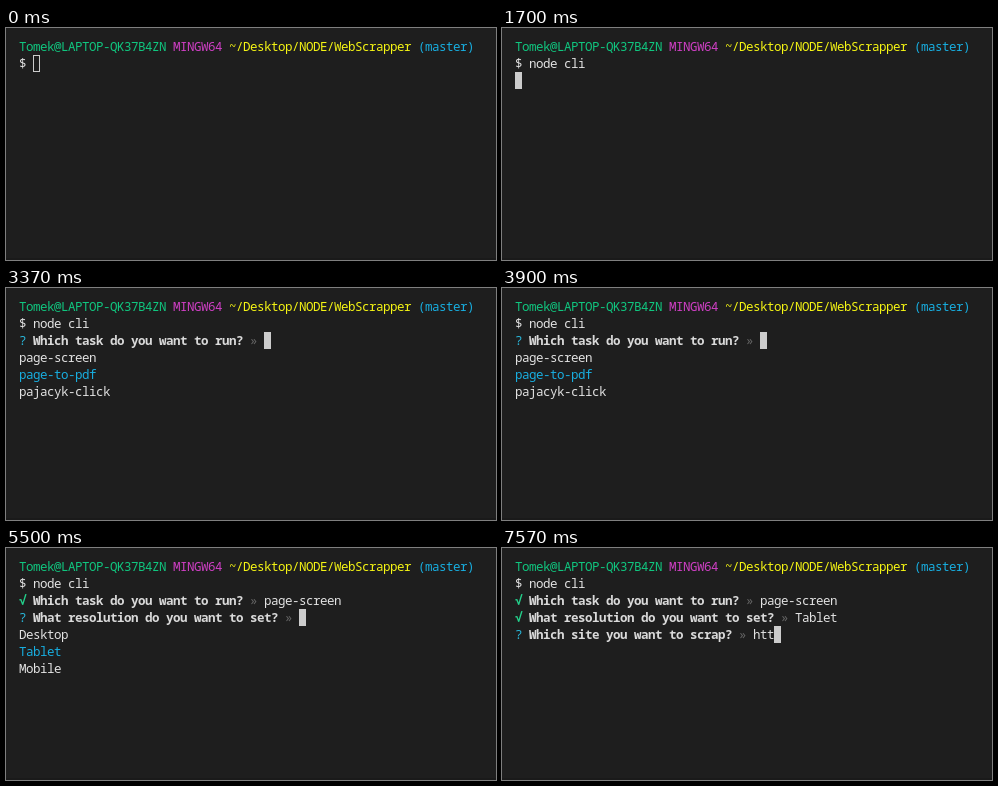
An HTML page for the animation above (8000 ms loop, 490x232 px).

```html
<!DOCTYPE html>
<html lang="en">
<head>
<meta charset="utf-8">
<title>Terminal prompt</title>
<style>
  html, body { margin: 0; width: 100%; height: 100%; overflow: hidden; background: #1e1e1e; }
  body::after { content: ""; position: absolute; left: 0; right: 0; top: 230px; height: 2px; background: #1a1a1a; }
  #term {
    position: absolute; left: 13px; top: 10px; color: #e2e2e2; white-space: pre;
    font: 500 12.5px/17px "Noto Sans Mono", "DejaVu Sans Mono", monospace;
    letter-spacing: -.5px;
    font-variant-ligatures: none;
  }
  #term div { height: 17px; }
  b { color: #dadada; }
  .green { color: #10c67f; }
  .magenta { color: #cf3fc4; }
  .yellow { color: #f5f514; }
  .cyan { color: #18aee0; }
  .ask { color: #29b8db; }
  .done { color: #23d18b; font-weight: bold; }
  .dim { color: #666; }
  .cursor { display: inline-block; width: 7px; height: 17px; vertical-align: top; box-sizing: border-box; background: #ccc; }
  .hollow { background: none; border: 1px solid #ccc; }
</style>
</head>
<body>
<div id="term"></div>
<script>
const LOOP = 8000;
const term = document.getElementById("term");

const span = (cls, text = "") => `<span class="${cls}">${text}</span>`;
const cursor = span("cursor");
const hollow = span("cursor hollow");

const header = [
  span("green", "Tomek@LAPTOP-QK37B4ZN"),
  span("magenta", "MINGW64"),
  span("yellow", "~/Desktop/NODE/WebScrapper"),
  span("cyan", "(master)")
].join(" ");

const prompt = (cls, mark, text, value) =>
  `${span(cls, mark)} <b>${text}</b> ${span("dim", "»")} ${value}`;
const ask = (text, typed = "") => prompt("ask", "?", text, typed + cursor);
const done = (text, answer) => prompt("done", "√", text, answer);
const menu = (items, active) => items.map((s, i) => i === active ? span("cyan", s) : s);

const tasks = ["page-screen", "page-to-pdf", "pajacyk-click"];
const sizes = ["Desktop", "Tablet", "Mobile"];
const taskQ = "Which task do you want to run?";
const sizeQ = "What resolution do you want to set?";
const siteQ = "Which site you want to scrap?";

const shell = (typed, cur = cursor) => ["$ " + typed + cur];
const run = (...lines) => ["$ node cli", ...lines];
const pickTask = i => run(ask(taskQ), ...menu(tasks, i));
const taskDone = done(taskQ, tasks[0]);
const pickSize = i => run(taskDone, ask(sizeQ), ...menu(sizes, i));
const typeSite = typed => run(taskDone, done(sizeQ, sizes[1]), ask(siteQ, typed));

// [start in ms, lines below the header]
const steps = [
  [0, shell("", hollow)],
  [500, shell("node ")],
  [830, shell("node c")],
  [970, shell("node cl")],
  [1230, shell("node cli")],
  [1700, run(cursor)],
  [2030, pickTask(0)],
  [3370, pickTask(1)],
  [3570, pickTask(2)],
  [3900, pickTask(1)],
  [4170, pickTask(0)],
  [4500, pickSize(0)],
  [5500, pickSize(1)],
  [6300, typeSite("")],
  [7230, typeSite("h")],
  [7370, typeSite("ht")],
  [7570, typeSite("htt")]
];

let shown;
function draw(now) {
  const t = now % LOOP;
  const step = steps.findLast(([start]) => start <= t);
  if (step !== shown) {
    shown = step;
    term.innerHTML = [header, ...step[1]].map(line => `<div>${line}</div>`).join("");
  }
  requestAnimationFrame(draw);
}
draw(0);
</script>
</body>
</html>
```
